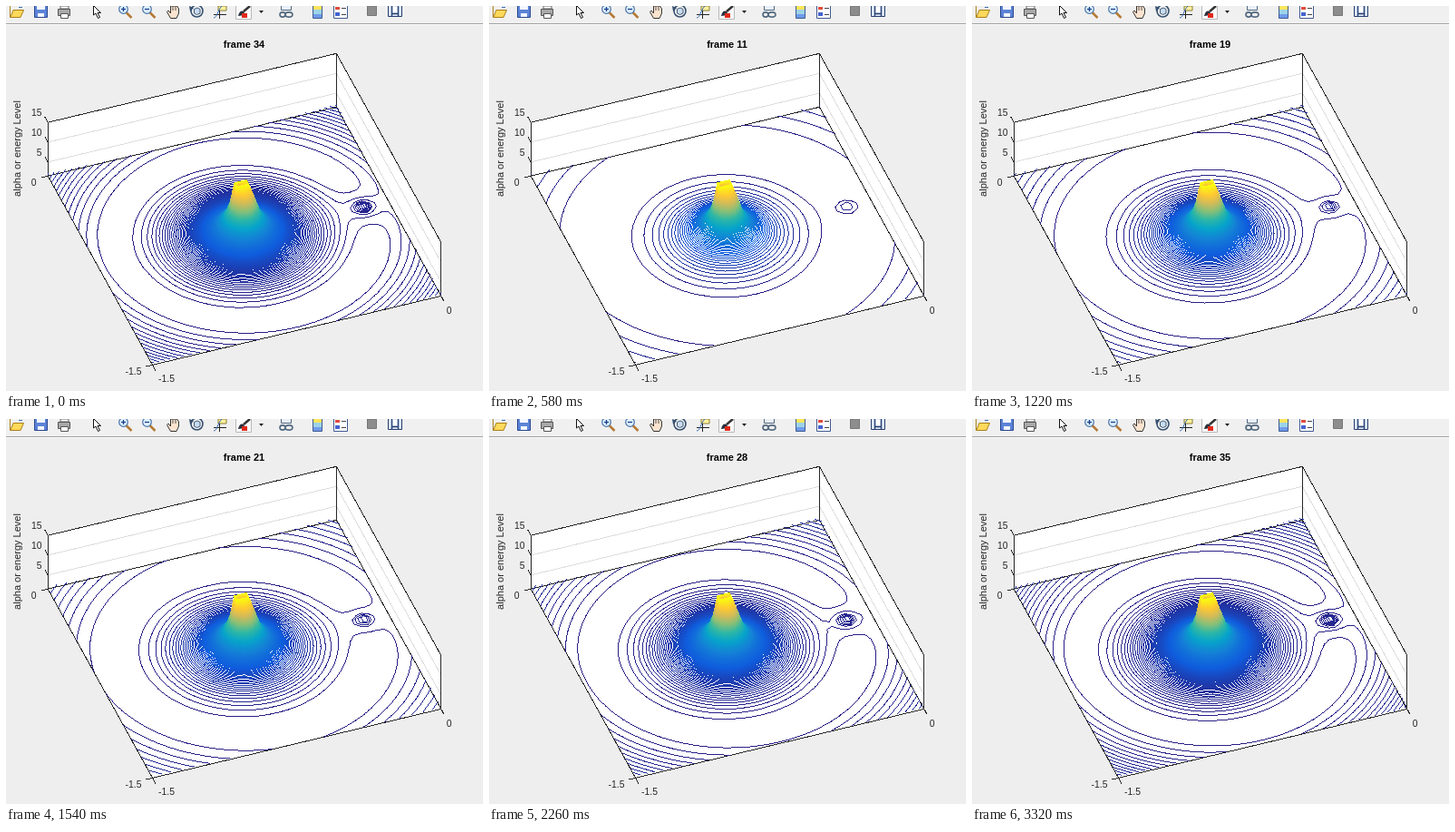
Recreate the animation shown at these times as an HTML page with a canvas. Size 526x424 px, loop 3.34 s.

```html
<!DOCTYPE html>
<html lang="en">
<head>
<meta charset="utf-8">
<title>Energy contours</title>
<style>
  html, body { margin: 0; width: 526px; height: 424px; overflow: hidden; background: #eee; }
  svg, canvas { position: absolute; left: 0; top: 0; display: block; }
  text { font: 11px "Liberation Sans", Arial, sans-serif; fill: #262626; }
  #title { font-weight: bold; fill: #000; }
  #ticks text { font-size: 10.4px; }
  #axes { shape-rendering: crispEdges; }
</style>
</head>
<body>
<svg width="526" height="424" viewBox="0 0 526 424">
  <rect width="526" height="424" fill="#eee"/>
  <g id="toolbar">
    <rect width="526" height="19" fill="#f0f0f0"/>
    <path d="M0 19.5H526" stroke="#a3a3a3"/>
    <path d="M0 20.5H526" stroke="#fafafa"/>
    <!-- open, save, print -->
    <path d="M4.500 0V12.500H16L19.500 4.500H8L5 12" fill="#ffd95a" stroke="#a97f1c"/>
    <path d="M14 1.500H18" stroke="#3a6fb0"/>
    <path d="M31.500 0V12.500H45.500V0" fill="#5b83d6" stroke="#29468e"/>
    <path d="M34 0H43V4H34ZM35 8H42V12H35Z" fill="#f3f6ff"/>
    <path d="M60 0H69V3H60Z" fill="#fff" stroke="#666"/>
    <path d="M57.500 3.500H70.500V10.500H57.500Z" fill="#a9a9a9" stroke="#555"/>
    <path d="M60.500 8.500H68.500V13.500H60.500Z" fill="#fff" stroke="#555"/>
    <!-- pointer -->
    <path d="M96.500 0V10L99 8L101.500 13.500L103.500 12.500L101 7.500H104.500L97 0Z" fill="#fff" stroke="#111"/>
    <!-- zoom -->
    <g id="lens">
      <path d="M132.500 7L138.500 13" stroke="#b57a35" stroke-width="2.500"/>
      <circle cx="129.500" cy="3.500" r="4.800" fill="#dff1ff" stroke="#4a74a8" stroke-width="1.200"/>
      <path d="M127 3.500H132" stroke="#1b3f8b" stroke-width="1.300"/>
    </g>
    <use href="#lens" x="26"/>
    <path d="M129.500 1V6" stroke="#1b3f8b" stroke-width="1.300"/>
    <!-- hand -->
    <path d="M181.500 13.500L177.500 6.500L179 5L181.500 8V0H188.500L190.500 3V8L188 13.500Z" fill="#fbe3cf" stroke="#333"/>
    <path d="M184 0V5M187 0V5" stroke="#555"/>
    <!-- rotate -->
    <circle cx="210.500" cy="5.500" r="6.500" fill="none" stroke="#36506f" stroke-width="1.600"/>
    <path d="M207.500 3.500L211 2L214 3.500V8L210.500 9.500L207.500 8Z" fill="#c9dcf0" stroke="#405a78"/>
    <path d="M202 0L203 6L207 2Z" fill="#36506f"/>
    <!-- data cursor -->
    <path d="M234 0H243V5H234Z" fill="#fff2a0" stroke="#8c7d30"/>
    <path d="M229 9.500H243M235.500 5V14" stroke="#222"/>
    <path d="M229 13C233 13 233 5 238 0" fill="none" stroke="#3267b8"/>
    <!-- brush -->
    <path d="M253.500 -1H270.500V14.500H253.500Z" fill="#fafafa" stroke="#b8b8b8"/>
    <path d="M269 0L262 6" stroke="#333" stroke-width="2.500"/>
    <path d="M256 11C257 6 260 4 263 7C262 10 259 11 256 11Z" fill="#27303c"/>
    <path d="M260 8H266V13H260Z" fill="#e02a1b"/>
    <path d="M279 5H284L281.500 8Z" fill="#222"/>
    <!-- link, colorbar, legend -->
    <path d="M303.500 0V4.500H314.500V0" fill="#e9eff8" stroke="#52687f"/>
    <path d="M302 9.500C302 6 308 6 308 9.500S302 13 302 9.500M308 9.500C308 6 316 6 316 9.500S308 13 308 9.500" fill="none" stroke="#52687f" stroke-width="1.600"/>
    <path d="M338.500 -1H348.500V13.500H338.500Z" fill="#9cd3e8" stroke="#405a90"/>
    <path d="M339 0H348V4H339Z" fill="#ffe45c"/>
    <path d="M339 9H348V13H339Z" fill="#6f9bea"/>
    <path d="M361.500 -1H376.500V13.500H361.500Z" fill="#fff" stroke="#405a90"/>
    <path d="M363 1H368V4H363Z" fill="#e04a3b"/>
    <path d="M363 7H368V11H363Z" fill="#4562d0"/>
    <path d="M370 2.500H375M370 9.500H375" stroke="#444"/>
    <!-- plot tools -->
    <path d="M398.500 0H408.500V10.500H398.500Z" fill="#8d8d8d" stroke="#777"/>
    <path d="M421.500 -1H436.500V11.500H421.500Z" fill="#dbe6f8" stroke="#263d6c"/>
    <path d="M425.500 0V11M432.500 0V11M426 8.500H432" stroke="#263d6c" stroke-width="1.300"/>
    <path d="M427 1H431V7H427Z" fill="#fff"/>
  </g>
  <g id="axes"></g>
  <text id="title" x="262.500" y="46" text-anchor="middle"></text>
  <text transform="translate(16.300 157) rotate(-90)" text-anchor="middle">alpha or energy Level</text>
  <g id="ticks" text-anchor="end">
    <text x="39.500" y="120.500">15</text>
    <text x="39.500" y="142.500">10</text>
    <text x="39.500" y="164.500">5</text>
    <text x="33.500" y="198">0</text>
    <text x="149.500" y="406">-1.5</text>
    <text x="186" y="414">-1.5</text>
    <text x="491.500" y="338.500">0</text>
  </g>
</svg>
<canvas id="plot" width="526" height="424"></canvas>
<script>
const LOOP = 3340, W = 526, H = 424;
const MU = 0.01215, HALF = 1.2, SIZE = 50, TOP = 15;
const ctx = document.getElementById('plot').getContext('2d');
const title = document.getElementById('title');
const image = ctx.createImageData(W, H);
const pixels = new Uint32Array(image.data.buffer);

// Effective potential of the rotating two-body field, clipped at TOP
function potential(x, y) {
  const r1 = Math.hypot(x + MU, y), r2 = Math.hypot(x - 1 + MU, y);
  return Math.min(TOP, (x * x + y * y) / 2 + (1 - MU) / r1 + MU / r2);
}

const step = 2 * HALF / (SIZE - 1);
const coord = i => -HALF + i * step;
const field = [];
for (let j = 0; j < SIZE; j++)
  for (let i = 0; i < SIZE; i++) field.push(potential(coord(i), coord(j)));
const LOW = Math.min(...field);

function project(x, y, z) {
  return [263 + 132.6 * x + 48.1 * y, 253.3 - 31.6 * x + 86.7 * y - 4.37 * (z - LOW)];
}

// Walls, floor, grid and ticks
function drawAxes() {
  const pt = (x, y, z) => project(x * HALF, y * HALF, z);
  const path = (pts, stroke, fill = 'none') =>
    `<path d="M${pts.map(p => p.map(v => v.toFixed(1)).join(' ')).join('L')}" fill="${fill}" stroke="${stroke}"/>`;
  const rail = z => [pt(-1, -1, z), pt(1, -1, z), pt(1, 1, z)];
  const tick = ([x, y], dx, dy) => path([[x, y], [x + dx, y + dy]], '#262626');
  const front = pt(-1, 1, LOW);
  const floor = [...rail(LOW), front];
  document.getElementById('axes').innerHTML =
    path([...rail(TOP), ...rail(LOW).reverse()], 'none', '#fff') +
    path([...floor, floor[0]], '#262626', '#fff') +
    path(rail(5), '#dedede') + path(rail(10), '#dedede') +
    path(rail(TOP), '#262626') +
    [[-1, -1], [1, -1], [1, 1]].map(([x, y]) => path([pt(x, y, LOW), pt(x, y, TOP)], '#262626')).join('') +
    [5, 10, 15].map(z => tick(pt(-1, -1, z), -3.3, -6)).join('') +
    tick(floor[0], -7, 1.7) + tick(front, -7, 1.7) +
    tick(front, 3.3, 6) + tick(pt(1, 1, LOW), 3.3, 6);
}

const STOPS = ['2a1f86', '0f5cdd', '1481d6', '06a4ca', '2eb7a4', '87bf77', 'd1bb59', 'fec832', 'f9fb0e']
  .map(h => [0, 2, 4].map(k => parseInt(h.slice(k, k + 2), 16)));
function color(t) {
  const s = Math.min(0.9999, Math.max(0, t)) * (STOPS.length - 1), i = Math.floor(s);
  const [r, g, b] = STOPS[i].map((c, k) => Math.round(c + (STOPS[i + 1][k] - c) * (s - i)));
  return (255 << 24 | b << 16 | g << 8 | r) >>> 0;
}

// Hard-edged line, one pixel wide
function line([x0, y0], [x1, y1], rgba) {
  const n = Math.max(1, Math.ceil(Math.max(Math.abs(x1 - x0), Math.abs(y1 - y0))));
  const flat = Math.abs(x1 - x0) > Math.abs(y1 - y0);
  const [a, b] = flat ? [x0, x1] : [y0, y1];
  const from = Math.floor(Math.min(a, b)), to = Math.floor(Math.max(a, b));
  for (let p = from; p <= to; p++) {
    const f = n > 1 ? Math.min(1, Math.max(0, (p + 0.5 - a) / (b - a))) : 0.5;
    const x = flat ? p : Math.floor(x0 + f * (x1 - x0));
    const y = flat ? Math.floor(y0 + f * (y1 - y0)) : p;
    pixels[y * W + x] = rgba;
  }
}

// Marching squares over the grid, segments grouped by level
function contours(count) {
  const gap = (TOP - LOW) / (count + 1);
  const levels = Array.from({ length: count }, () => []);
  for (let j = 0; j < SIZE - 1; j++) for (let i = 0; i < SIZE - 1; i++) {
    const o = j * SIZE + i;
    const v = [field[o], field[o + 1], field[o + SIZE + 1], field[o + SIZE]];
    const xs = [coord(i), coord(i + 1), coord(i + 1), coord(i)];
    const ys = [coord(j), coord(j), coord(j + 1), coord(j + 1)];
    const first = Math.max(1, Math.ceil((Math.min(...v) - LOW) / gap));
    const last = Math.min(count, Math.floor((Math.max(...v) - LOW) / gap));
    for (let k = first; k <= last; k++) {
      const z = LOW + k * gap, hits = [];
      for (let a = 0; a < 4; a++) {
        const b = (a + 1) % 4;
        if (v[a] > z === v[b] > z) continue;
        const f = (z - v[a]) / (v[b] - v[a]);
        hits.push(project(xs[a] + f * (xs[b] - xs[a]), ys[a] + f * (ys[b] - ys[a]), z));
      }
      const mid = (v[0] + v[1] + v[2] + v[3]) / 4;
      if (hits.length === 4 && mid > z !== v[0] > z) hits.unshift(hits.pop());
      levels[k - 1].push(...hits);
    }
  }
  return levels;
}

function draw(n) {
  title.textContent = 'frame ' + n;
  pixels.fill(0);
  const levels = contours(10 * (n - 1));
  levels.forEach((pts, k) => {
    const rgba = color(k / (levels.length - 1));
    for (let h = 0; h + 1 < pts.length; h += 2) line(pts[h], pts[h + 1], rgba);
  });
  ctx.putImageData(image, 0, 0);
}

// Start times of some steps; each redraw takes longer as levels are added
const KEYS = [[1, 20], [11, 580], [19, 1220], [25, 1900], [28, 2260], [32, 2840], [33, 2980], [34, 3160], [35, 3320]];
function stepAt(t) {
  if (t < KEYS[0][1]) return 34;
  const i = KEYS.findLastIndex(([, start]) => t >= start);
  const [n, start] = KEYS[i], [next, end] = KEYS[i + 1] || [n + 1, LOOP];
  return n + Math.floor((t - start) / (end - start) * (next - n));
}

let shown = 0;
const origin = performance.now();
function tick(now) {
  const n = stepAt(Math.max(0, now - origin) % LOOP);
  if (n !== shown) draw(shown = n);
  requestAnimationFrame(tick);
}
drawAxes();
tick(origin);
</script>
</body>
</html>
```
